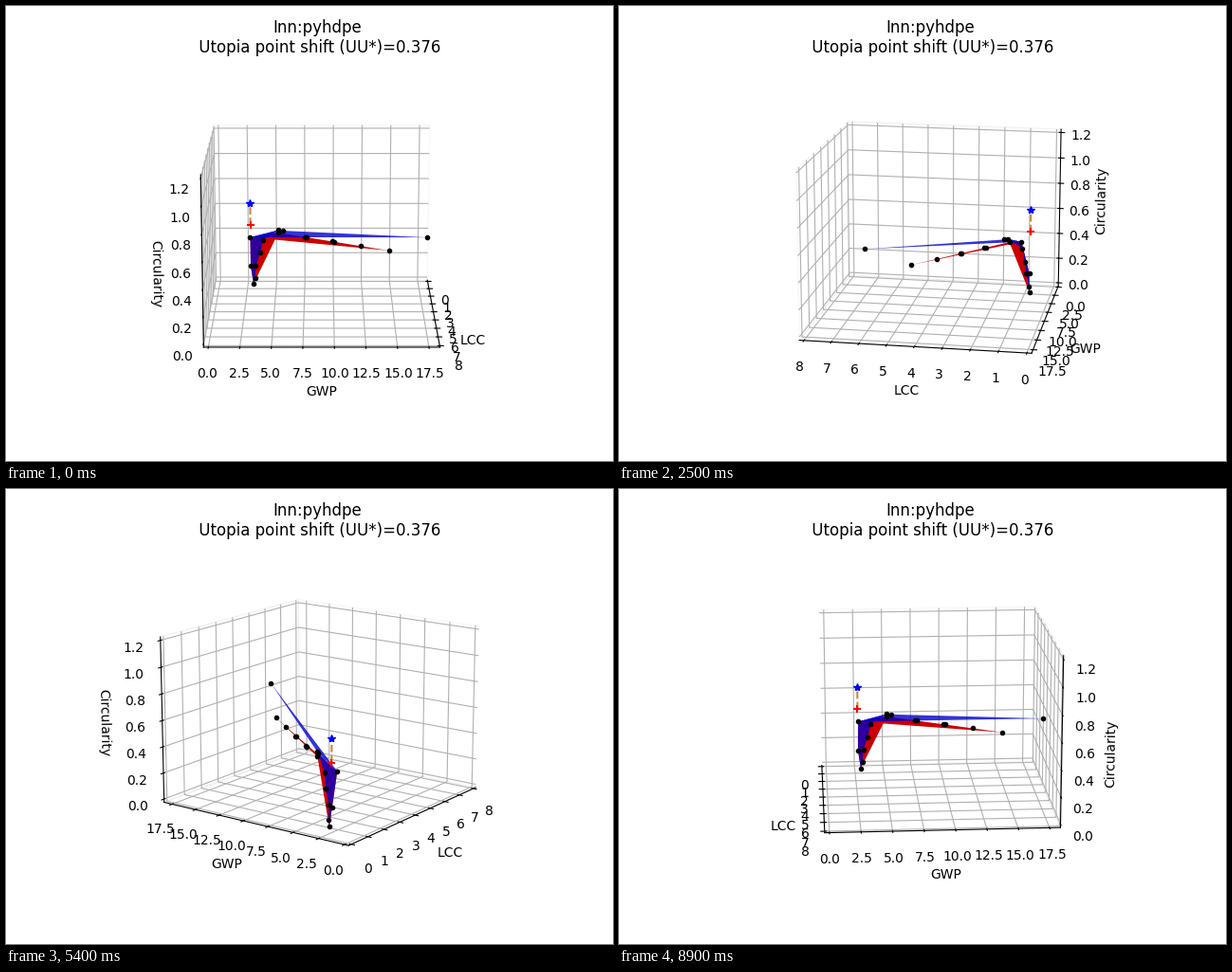
Animation, 640 px wide and 480 px high, one loop 9 s. Source, as a matplotlib script:

```python
import numpy as np
import matplotlib.pyplot as plt
from matplotlib.animation import FuncAnimation
from mpl_toolkits.mplot3d.art3d import Poly3DCollection

FRAMES = 90
STEP = 360 / FRAMES

# (LCC, GWP, Circularity)
knee = (1.123, 2.788, 0.396)
base = (0.779, 3.01, 0.0)
low = (0.808, 2.779, 0.146)
curve = [(0.815, 3.144, 0.050), (0.903, 3.24, 0.155),
         (0.951, 3.628, 0.261), (1.035, 3.892, 0.372)]
ridge = [(1.501, 5.244, 0.473), (1.634, 5.617, 0.476)]
blue_tip = (5.839, 17.52, 0.651)
red_near = np.array([1.445, 5.25, 0.449])
red_tip = np.array([4.43, 14.54, 0.474])
red_line = [red_near + s * (red_tip - red_near)
            for s in (0, 0.25, 0.265, 0.5, 0.512, 0.75, 1)]
utopia = (0.779, 2.78, 0.649)
shifted = (0.779, 2.78, 0.476)


def fan(hub, rim):
    return [(hub, a, b) for a, b in zip(rim, rim[1:])]


def surface(tris, color):
    ax.add_collection3d(Poly3DCollection(tris, facecolors=[color], linewidths=0))


def dots(points, style, **kw):
    x, y, z = np.transpose(points)
    ax.plot(x, y, z, style, **kw)


fig = plt.figure(figsize=(6.4, 4.8), dpi=100)
ax = fig.add_subplot(projection="3d")

surface([(knee, low, base)] + fan(knee, [base, red_near, red_tip]),
        (0.8, 0, 0, 1))
surface(fan(low, [base] + curve[:2] + [knee])
        + fan(knee, curve[1:] + ridge + [blue_tip]),
        (0, 0, 0.8, 0.8))

dots([shifted, utopia], "--", color="peru", zorder=10)
dots([knee, base, low, blue_tip, *curve, *ridge, *red_line], "k.", zorder=11)
dots([utopia], "b*", zorder=12)
dots([shifted], "r+", mew=1.5, zorder=12)

spans = [(ax.xaxis, ax.set_xlim, 8, 1), (ax.yaxis, ax.set_ylim, 18, 2.5),
         (ax.zaxis, ax.set_zlim, 1.2, 0.2)]
for axis, set_lim, top, step in spans:
    axis.set_ticks(np.arange(0, top + step / 10, step))
    set_lim(-top / 48, top * 49 / 48)
    axis.pane.fill = False

ax.set_xlabel("LCC")
ax.set_ylabel("GWP")
ax.set_zlabel("Circularity")
ax.set_title("Inn:pyhdpe\n Utopia point shift (UU*)=0.376")


def update(i):
    # the tiny offset settles which walls face away at 0 and 180 degrees
    ax.view_init(elev=15, azim=i * STEP + 0.01)
    return []


anim = FuncAnimation(fig, update, frames=FRAMES, interval=100,
                     repeat=True, repeat_delay=0, blit=False)
plt.show()
```
